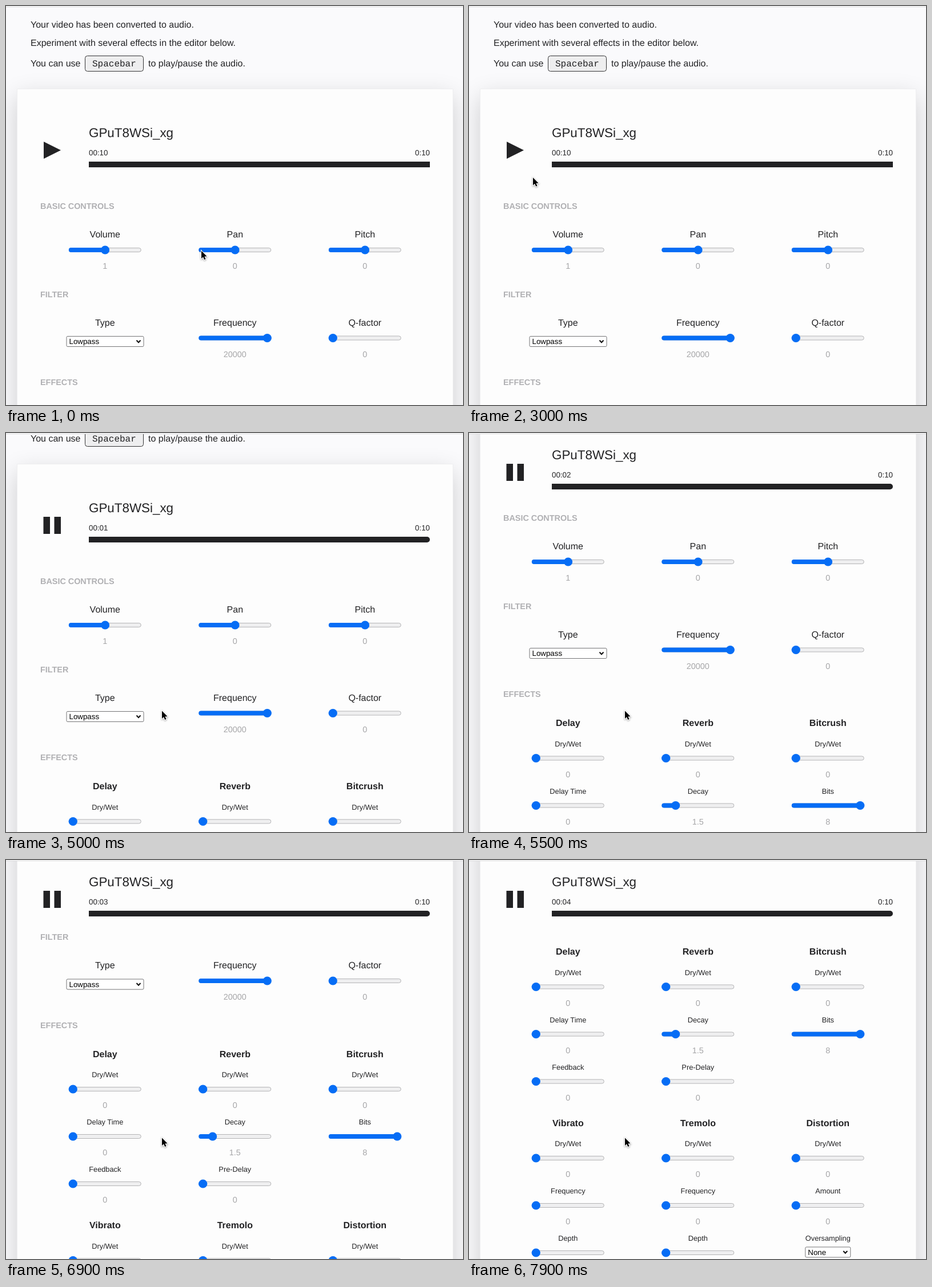
An HTML page with a canvas for the animation above (8 s loop, 800 by 700 pixels).

```html
<!DOCTYPE html>
<html lang="en">
<head>
<meta charset="utf-8">
<title>Audio editor</title>
<style>
  html, body { margin: 0; width: 100%; height: 100%; overflow: hidden; background: #fafafc; }
  canvas { display: block; }
</style>
</head>
<body>
<canvas id="stage" width="800" height="700"></canvas>
<script>
const ctx = document.getElementById('stage').getContext('2d');
ctx.textRendering = 'geometricPrecision';

const LOOP = 8000, TICK = 100, PLAY_AT = 3400, STICKY_AT = 184;
const COLUMNS = [173.3, 400.8, 628.3];
const INK = '#222224', MUTED = '#a6a6a8', HEADING = '#b0b0b3';
const PAGE = '#fafafc', CARD = '#fdfdfd', BLUE = '#066df5', TRACK = '#efeff0';
const SANS = '"Liberation Sans", Arial, sans-serif';
const MONO = '"Liberation Mono", monospace';

// Rows are [time, value, ...]
const SCROLL = [[4700, 0], [5000, 91], [5500, 202], [6900, 370.5], [7900, 550]];
const POINTER = [
  [1500, 342, 429.5], [3000, 112, 301], [3300, 82, 256], [3600, 82, 256],
  [4100, 227, 404], [4500, 273, 487.5]
];

function sample(keys, t) {
  const next = keys.findIndex(key => key[0] > t);
  if (next === 0) return keys[0].slice(1);
  if (next < 0) return keys[keys.length - 1].slice(1);
  const a = keys[next - 1], b = keys[next];
  const k = (t - a[0]) / (b[0] - a[0]);
  return a.slice(1).map((v, i) => v + (b[i + 1] - v) * k);
}

function text(str, x, y, size, { color = INK, align = 'left', weight = '', family = SANS } = {}) {
  ctx.font = `${weight} ${size}px ${family}`;
  ctx.textAlign = align;
  ctx.fillStyle = color;
  ctx.fillText(str, x, y);
}

function box(x, y, w, h, radius, fill, stroke) {
  ctx.beginPath();
  ctx.roundRect(x, y, w, h, radius);
  ctx.fillStyle = fill;
  ctx.fill();
  if (stroke) {
    ctx.lineWidth = 1;
    ctx.strokeStyle = stroke;
    ctx.stroke();
  }
}

function polygon(points) {
  ctx.beginPath();
  points.forEach(([x, y]) => ctx.lineTo(x, y));
  ctx.closePath();
}

// Slider with its value below; level runs from 0 to 1
function slider(cx, cy, level, value) {
  const left = cx - 63, thumb = left + 7 + level * 112.5;
  box(left, cy - 3.5, 126, 7, 3.5, TRACK, '#b4b4b6');
  ctx.beginPath();
  box(left - .5, cy - 4, thumb - left, 8, 4, BLUE);
  ctx.beginPath();
  ctx.arc(thumb, cy, 7.6, 0, Math.PI * 2);
  ctx.fill();
  text(value, cx, cy + 33, 14.4, { color: MUTED, align: 'center' });
}

function select(cx, top, width, value) {
  const left = cx - width / 2, arrow = left + width - 9;
  box(left, top, width, 18, 2, '#ffffff', '#757577');
  text(value, left + 4.5, top + 13.6, 13.33, { color: '#000000' });
  ctx.beginPath();
  ctx.moveTo(arrow - 3.5, top + 7);
  ctx.lineTo(arrow, top + 10.7);
  ctx.lineTo(arrow + 3.5, top + 7);
  ctx.lineWidth = 2;
  ctx.strokeStyle = '#101010';
  ctx.stroke();
}

const heading = (str, y) => text(str, 60, y, 14.4, { color: HEADING, weight: 'bold' });

function control(column, y, name, level, value) {
  text(name, COLUMNS[column], y, 16, { align: 'center' });
  if (value !== undefined) slider(COLUMNS[column], y + 22, level, value);
}

function effect(column, y, name, rows) {
  const cx = COLUMNS[column];
  text(name, cx, y, 16, { align: 'center', weight: 'bold' });
  rows.forEach(([label, level = 0, value = '0'], i) => {
    const rowY = y + 35.5 + i * 83;
    text(label, cx, rowY, 12.8, { align: 'center' });
    if (level === 'select') select(cx, rowY + 11, 79, value);
    else slider(cx, rowY + 21, level, value);
  });
}

function drawIntro() {
  text('Your video has been converted to audio.', 43, 38, 16);
  text('Experiment with several effects in the editor below.', 43, 70, 16);
  text('You can use', 43, 106, 16);
  box(138.5, 87.5, 102, 27, 4, '#eeeeef', '#333335');
  text('Spacebar', 151, 106, 16, { family: MONO });
  text('to play/pause the audio.', 249, 106, 16);
}

function drawCard() {
  ctx.save();
  ctx.shadowColor = 'rgba(0, 0, 10, .19)';
  ctx.shadowBlur = 40;
  ctx.shadowOffsetY = 14;
  box(20, 146, 762, 1600, 0, CARD);
  ctx.restore();
  box(19.5, 145.5, 763, 1600, 0, CARD, '#eeeef0');
}

function drawControls() {
  heading('BASIC CONTROLS', 356);
  control(0, 406, 'Volume', .5, '1');
  control(1, 406, 'Pan', .5, '0');
  control(2, 406, 'Pitch', .5, '0');

  heading('FILTER', 510.5);
  control(0, 560.5, 'Type');
  select(COLUMNS[0] + .2, 579.5, 135, 'Lowpass');
  control(1, 560.5, 'Frequency', 1, '20000');
  control(2, 560.5, 'Q-factor', 0, '0');

  heading('EFFECTS', 665);
  const mix = ['Dry/Wet'];
  effect(0, 716, 'Delay', [mix, ['Delay Time'], ['Feedback']]);
  effect(1, 716, 'Reverb', [mix, ['Decay', .15, '1.5'], ['Pre-Delay']]);
  effect(2, 716, 'Bitcrush', [mix, ['Bits', 1, '8']]);
  effect(0, 1016.5, 'Vibrato', [mix, ['Frequency'], ['Depth']]);
  effect(1, 1016.5, 'Tremolo', [mix, ['Frequency'], ['Depth']]);
  effect(2, 1016.5, 'Distortion', [mix, ['Amount'], ['Oversampling', 'select', 'None']]);
}

function drawPlayer(t) {
  const playing = t >= PLAY_AT;
  const seconds = playing ? Math.floor((t - PLAY_AT) / 1000) : 10;
  box(60, 186, 683, 128, 0, CARD);
  ctx.fillStyle = INK;
  if (playing) {
    ctx.fillRect(65.5, 238, 11.5, 30);
    ctx.fillRect(84.5, 238, 11.5, 30);
  } else {
    polygon([[66, 238], [96, 253], [66, 268]]);
    ctx.fill();
  }
  text('GPuT8WSi_xg', 145, 230, 22.4);
  text('00:' + String(seconds).padStart(2, '0'), 145, 262, 13.33);
  text('0:10', 742, 262, 13.33, { align: 'right' });
  const end = playing ? 5 : 0;
  box(145, 273, 597, 10, [0, end, end, 0], INK);
}

function drawPointer(x, y) {
  ctx.save();
  ctx.translate(x, y);
  polygon([[0, 0], [0, 13.6], [3.1, 10.8], [5.2, 15.6], [7.5, 14.6], [5.4, 10], [9.6, 9.8]]);
  ctx.shadowColor = 'rgba(0, 0, 0, .4)';
  ctx.shadowBlur = 3;
  ctx.shadowOffsetY = 1;
  ctx.lineWidth = 2;
  ctx.strokeStyle = '#ffffff';
  ctx.stroke();
  ctx.shadowColor = 'transparent';
  ctx.fillStyle = '#000000';
  ctx.fill();
  ctx.restore();
}

function draw(t) {
  const [scroll] = sample(SCROLL, t);
  box(0, 0, 800, 700, 0, PAGE);

  ctx.save();
  ctx.translate(0, -scroll);
  drawIntro();
  drawCard();
  drawControls();
  ctx.translate(0, Math.max(0, scroll - STICKY_AT));
  drawPlayer(t);
  ctx.restore();

  box(0, 0, 800, 1, 0, '#ffffff');
  box(0, 1, 800, 1, 0, '#dadadc');
  drawPointer(...sample(POINTER, t));
}

function frame() {
  const t = performance.now() % LOOP;
  draw(Math.floor(t / TICK) * TICK);
  requestAnimationFrame(frame);
}
frame();
</script>
</body>
</html>
```
